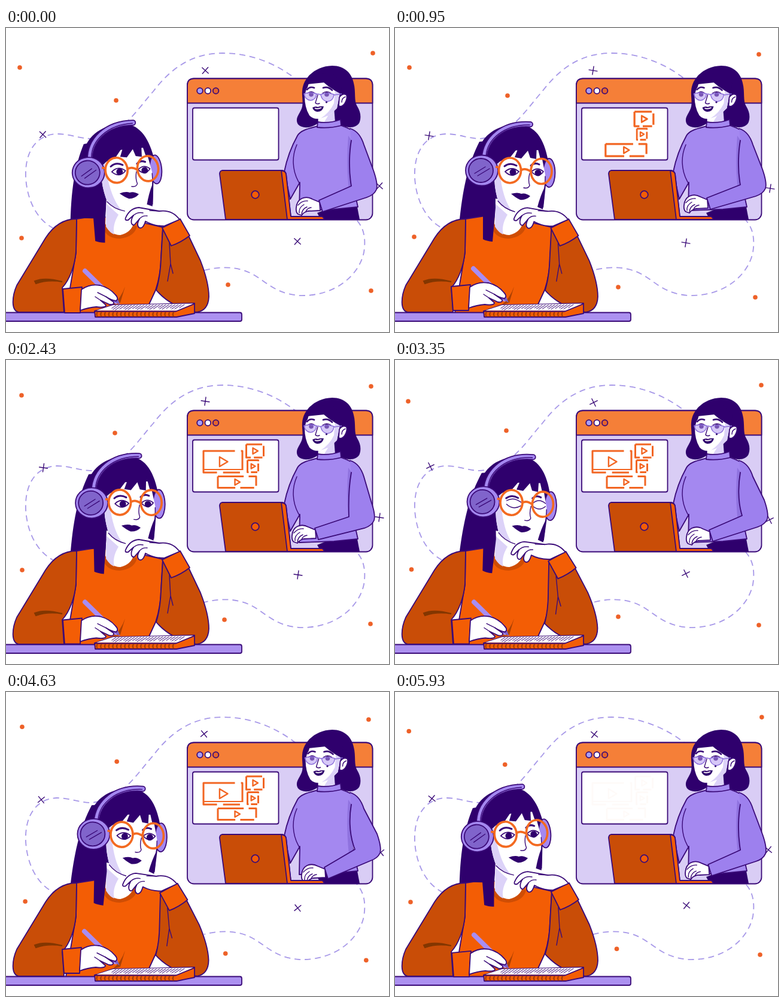
Write an HTML page that moves like this. It is 640 px wide and 508 px high and loops after 5980 ms.

```html
<!DOCTYPE html>
<html lang="en">
<head>
<meta charset="utf-8">
<title>Online lesson</title>
<style>
html, body { margin: 0; width: 100%; height: 100%; overflow: hidden; background: #fff; }
svg { display: block; width: 100vw; height: 100vh; }
.o { stroke: #3a0a78; stroke-width: 1.8; stroke-linejoin: round; stroke-linecap: round; }
.l { fill: none; stroke: #3a0a78; stroke-width: 1.4; stroke-linejoin: round; stroke-linecap: round; }
.ink { fill: #2f006d; }
.lav { fill: #a488f0; }
.org { fill: #f35d05; }
.rust { fill: #c94d07; }
.skin { fill: #fff; }
.shade { fill: #dcd2f8; }
.icon { fill: none; stroke: #f26522; stroke-width: 3; stroke-linejoin: round; }
</style>
</head>
<body>
<svg viewBox="0 0 640 508" xmlns="http://www.w3.org/2000/svg">
  <g id="trail" fill="none" stroke="#a798e8" stroke-width="1.8" stroke-dasharray="10 7">
    <path d="M80 335C50 320 35 285 33 250C31 205 52 178 85 177C110 177 130 188 150 184C195 178 220 135 246 106C275 68 310 42 362 42C410 42 452 60 484 85"/>
    <path d="M331 405C350 400 372 398 394 404C430 414 440 443 490 447C550 449 590 413 598 375C602 350 597 333 586 321"/>
  </g>
  <g id="drift"></g>

  <!-- browser window -->
  <rect class="o" x="303" y="84.500" width="309.500" height="236" rx="11" fill="#d9cdf5"/>
  <path class="o" d="M303 125.500V95.500Q303 84.500 314 84.500H601.500Q612.500 84.500 612.500 95.500V125.500Z" fill="#f57f38"/>
  <g class="o">
    <circle cx="324" cy="105" r="4.800" fill="#a9a0f5"/><circle cx="337.300" cy="105" r="4.800" fill="#fff"/><circle cx="350.600" cy="105" r="4.800" fill="#e5652c"/>
  </g>
  <rect class="o" x="312" y="133.500" width="143.500" height="87" rx="3" fill="#fff"/>
  <g id="icons"></g>

  <!-- teacher -->
  <g>
    <path class="ink" d="M545 63C566 63 578 76 581 92C585 107 581 122 587 131C592 139 594 148 591 157C587 167 572 168 562 163L520 160C509 168 494 168 488 161C483 152 488 147 493 137C498 127 494 116 495 105C496 85 515 64 545 63Z"/>
    <path class="ink" d="M520 309L548 298L586 294L591 320H526Z"/>
    <path class="o lav" d="M521 164C505 168 492 171 487 180C477 198 469 220 465 240L475 286L491 258L490 305L548 303L588 299L576 245L590 180C583 172 572 167 560 163Z"/>
    <path d="M572 180Q568 230 573 270L580 266L579 190Z" fill="#8f72df"/>
    <path class="l" d="M486 195C478 213 477 237 490 259"/>
    <path class="shade" d="M521 143L548 132L550 158L522 160Z"/>
    <path class="skin" d="M522 148L538 147L531 158H522Z"/>
    <path class="o lav" d="M521 157Q540 160 559 153L560 163Q541 168 520 166Z"/>
    <path id="arm" class="o" fill="#9d80ee"/>
    <g id="typing">
      <path class="o skin" d="M525 305L504 306Q497 308 494 313L488 311Q484 308 485 300Q486 289 494 285Q503 281 512 286L524 291Z"/>
      <path class="l" d="M490 309Q489 300 498 295M494 311Q495 302 503 299M501 307Q503 301 510 300M488 296Q495 288 504 289"/>
    </g>
    <g id="teacherFace">
      <path class="skin" d="M504 94L499 113Q499 133 507 146Q514 154 526 151Q541 147 553 134L558 108L542 90Z"/>
      <path class="shade" d="M550 102L558 108L553 134Q541 147 526 151Q541 141 548 126Z"/>
      <path class="o skin" d="M557 116Q563 108 569 112Q571 118 566 126Q561 133 556 130Z"/>
      <path class="l" d="M561 124Q561 117 567 115"/>
      <path class="ink" d="M504 99Q508 82 522 82Q536 98 559 110L562 92L545 75L511 78Q499 89 500 105Z"/>
      <path class="l" d="M503 103Q508 97 515 100M530 100Q538 97 545 104" style="stroke-width:2.600"/>
      <g class="open"><circle class="ink" cx="510" cy="111" r="3.800"/><circle class="ink" cx="536" cy="111" r="3.800"/><path class="l" d="M504 109Q510 104 516 109M529 109Q536 104 543 109"/></g>
      <path class="l shut" d="M503 112Q509 116 516 112M529 112Q536 117 543 112"/>
      <g stroke="#8d70dc" stroke-width="1.500" fill="#b49bf0" fill-opacity=".55">
        <path d="M498 110Q508 106 519 110Q518 120 509 121Q500 120 498 110ZM526 111Q537 107 548 111Q547 122 537 123Q527 121 526 111Z"/>
        <path d="M519 111Q522 109 526 112M548 112L561 110" fill="none"/>
      </g>
      <path class="l" d="M521 112L517 125Q519 128 524 126"/>
      <path class="ink" d="M512 133Q517 130 521 132Q526 130 531 131Q529 140 520 140Q514 139 512 133Z"/>
      <path d="M516 134Q521 136 527 133" stroke="#fff" stroke-width="1.800" fill="none"/>
      <circle class="ink" cx="535.500" cy="124" r="1.600"/>
    </g>
  </g>

  <!-- laptop -->
  <path class="o rust" d="M361 238H461Q467 239 468 244L476 316L472 320H367L357 244Q357 239 361 238Z"/>
  <path class="o org" d="M460 238Q467 239 468 244L476 315H528Q532 317 531 320H470Z"/>
  <circle class="o org" cx="416.500" cy="278.500" r="6.300"/>

  <!-- student -->
  <path class="ink head" d="M141 190C126 220 114 255 107 330H165L175 260H240L242 300H248L256 225L240 180Z"/>
  <path class="org o" d="M118 319L150 314L215 322L262 333L259 385Q258 415 250 438L238 464L180 476H100L117 375Z"/>
  <path class="o rust" d="M118 319C94 319 77 334 66 351L18 430C10 448 8 472 21 475H97L94 434C107 420 115 396 117 374Z"/>
  <path d="M48 423Q65 416 94 424Q70 420 50 427Z" fill="#833600" stroke="#833600" stroke-width="2"/>
  <path d="M199 432Q192 452 178 463L191 459Z" fill="#a94004"/>
  <path d="M160 326Q164 352 190 352Q215 349 219 331L209 328Q190 350 168 326Z" fill="#cf4d04"/>
  <path class="skin" d="M168 285L166 327Q174 346 191 346Q209 342 214 325L210 295Z"/>
  <path class="shade" d="M168 294L167 332Q174 343 181 345Q177 330 188 312Z"/>
  <g class="head">
    <ellipse class="o lav" cx="257.500" cy="242" rx="10" ry="24"/>
    <path class="skin" d="M164 205L165 245Q167 274 173 291Q190 307 211 308Q239 306 245 290Q251 274 251 245L243 204Z"/>
    <path class="shade" d="M164 222L165 245Q167 274 173 291L196 307Q176 281 174 222Z"/>
    <path class="l" d="M172 289Q182 302 200 307M251 248Q251 274 245 289"/>
    <path class="ink" d="M250 266Q243 280 238 299L247 303Q250 285 250 266Z"/>
    <path class="ink" d="M141 200C150 175 176 161 205 161C234 162 249 184 256 222L243 219L237 195L236 219L226 217L222 205L211 218L200 216L207 198L191 218L177 222L165 231L168 300L163 357Q153 356 147 353V315L118 312C126 270 132 225 141 200Z"/>
    <path d="M149 218C151 185 180 158 226 161" class="l" style="stroke-width:10"/>
    <path d="M149 218C151 185 180 158 226 161" class="l" style="stroke:#a488f0;stroke-width:6.500"/>
    <path d="M152 214C154 186 182 161 225 162" class="l"/>
    <ellipse class="o lav" cx="145" cy="238" rx="27" ry="25.500"/>
    <ellipse class="o" cx="143.500" cy="238" rx="20.500" ry="20" fill="#8064cb"/>
    <path class="l" d="M133 243L151 232M138 247L158 235"/>
    <path class="l" d="M183 231Q192 224 203 230M227 230Q233 224 241 228" style="stroke-width:3"/>
    <g class="open">
      <path class="l" d="M184 240Q195 230 207 240Q196 252 184 240M228 240Q238 231 248 240Q239 252 228 240" style="stroke-width:1.800"/>
      <circle class="ink" cx="197" cy="241" r="5.500"/><circle class="ink" cx="239" cy="242" r="5.500"/>
    </g>
    <path class="l shut" d="M184 235Q195 228 208 237M184 241Q195 251 208 243M228 238Q238 229 249 238M228 243Q239 252 249 243"/>
    <path class="l" d="M225 243Q222 255 225 263Q223 269 215 267"/>
    <path class="ink" d="M194 277Q205 274 211 277Q218 275 226 281Q219 288 209 287Q202 284 194 277Z"/>
    <g fill="none" stroke="#f36a21" stroke-width="3.700">
      <ellipse cx="192" cy="238" rx="18.500" ry="21"/><ellipse cx="244.500" cy="239.500" rx="17.500" ry="21"/>
      <path d="M210 238Q217 233 227 240M174 233L168 232"/>
    </g>
  </g>
  <g id="chinArm">
    <path class="o rust" d="M262 335L259 385Q258 415 251 438Q264 453 281 462Q300 474 319 475Q338 472 339 449Q339 425 325 389L306 349Z"/>
    <path class="l" d="M273 360L275 394L270 423M275 394L279 410"/>
    <path class="o org" d="M261 334L291 319L307 347Q293 358 276 364Z"/>
    <path class="o skin" d="M290 320C282 309 270 304 256 306L222 300Q207 301 200 317Q198 322 204 321L213 313Q208 321 210 327Q213 332 217 326L223 319Q217 330 223 334Q229 336 233 323Q247 331 264 331Z"/>
    <path class="l" d="M213 313Q220 307 229 309M223 319Q228 313 236 314M256 306L240 305"/>
  </g>

  <!-- desk -->
  <path class="o" d="M-5 475.500H391Q394 475.500 394 479V487Q394 490 391 490H-5Z" fill="#ac91f0"/>
  <g id="writing">
    <path d="M132 406L184 457" stroke="#a88df3" stroke-width="8" stroke-linecap="round"/>
    <path d="M179 456L185 450L191 463Z" fill="#7d62c9"/>
    <path class="o org" d="M95 436L127 433L124 476H98Z"/>
    <path class="o skin" d="M126 437Q140 427 157 430Q173 434 183 446Q189 452 184 456Q176 455 167 449L180 458Q181 463 173 462L158 455L167 463Q167 468 151 466Q138 467 124 472Z"/>
    <path class="l" d="M167 449L153 442M158 455L149 449"/>
  </g>
  <path class="o org" d="M148 473L178 463L315 460V477L285 483H149Z"/>
  <path class="skin" d="M151 472L179 463L313 460.500L286 472.500Z"/>
  <path class="o" d="M148 473.500H284L315 461" fill="none"/>
  <g id="pageMarks" fill="none"></g>
</svg>
<script>
const LOOP = 5.98, HALF = LOOP / 2;
const POSES = [0, .95, 1.73, 2.43, 3.35, 4.63];
const DRIFTS = [0, .36, .95, 1.68, 2.43];
const $ = s => document.querySelector(s);
const all = s => [...document.querySelectorAll(s)];
const clamp = v => Math.max(0, Math.min(1, v));

function add(parent, tag, attrs) {
  const el = document.createElementNS('http://www.w3.org/2000/svg', tag);
  for (const k in attrs) el.setAttribute(k, attrs[k]);
  return parent.appendChild(el);
}

// Smooth closed curve through values at the given times.
function track(t, times, values, period) {
  const n = times.length;
  const at = i => times[(i + n) % n] + period * Math.floor(i / n);
  const val = i => values[(i + n) % n];
  const slope = i => (val(i + 1) - val(i - 1)) / (at(i + 1) - at(i - 1));
  let i = n - 1;
  while (times[i] > t) i--;
  const d = at(i + 1) - at(i), u = (t - at(i)) / d, v = 1 - u;
  return v * v * (1 + 2 * u) * val(i) + u * v * v * d * slope(i)
    + u * u * (3 - 2 * u) * val(i + 1) - u * u * v * d * slope(i + 1);
}
const pose = (t, ...values) => track(t, POSES, values, LOOP);

const dots = [
  [[23, 22, 24, 27, 26], [66, 69, 66, 58, 59]],
  [[184, 186, 188, 185, 182], [121, 118, 113, 116.500, 122]],
  [[613, 612, 608, 606, 610], [42, 42, 44, 46, 44]],
  [[26, 27.500, 32, 32, 27], [351, 350, 349, 350, 351]],
  [[371, 373, 373, 366.500, 365], [429, 429, 433, 437, 434]],
  [[610, 608, 602, 602, 609], [439, 443, 450, 448, 441]]
].map(([x, y]) => ({ x, y, el: add($('#drift'), 'circle', { r: 3.8, fill: '#ee6128' }) }));

const crosses = [
  [[333, 332, 331, 331, 333], [71, 71, 71, 70, 69]],
  [[61.500, 59, 57, 59, 62.500], [178, 178, 180, 180, 180]],
  [[624, 626, 627, 626, 624], [264, 267, 268, 268, 263]],
  [[487, 486, 486, 487.500, 488], [356.500, 357, 359, 361, 359]]
].map(([x, y]) => ({ x, y, el: add($('#drift'), 'path', { class: 'l', d: 'M-7 0H7M0-7V7' }) }));

const icons = [
  { x: 362.500, y: 170, w: 65, h: 36, play: 8, start: 1.02, bar: true },
  { x: 416, y: 152, w: 29, h: 22, play: 5, start: .68 },
  { x: 412.500, y: 177.500, w: 18, h: 20, play: 4, start: .82 },
  { x: 386, y: 204, w: 64, h: 19, play: 5, start: .64 }
].map(icon => {
  const { w, h, play, bar } = icon;
  const el = add($('#icons'), 'g', { class: 'icon' });
  add(el, 'rect', { x: -w / 2, y: -h / 2, width: w, height: h, pathLength: 100, 'stroke-dasharray': '26 5 17 4 14 5 29 0' });
  add(el, 'path', { d: `M${-play * .7} ${-play}L${play} 0L${-play * .7} ${play}Z`, 'stroke-width': 2.4 });
  if (bar) add(el, 'path', { d: `M${-w / 2} ${h / 2 - 5}H${w / 2}`, 'stroke-width': 2 });
  return { ...icon, el };
});

for (let i = 0; i < 20; i++) {
  const x = 153 + i * 6.7;
  add($('#pageMarks'), 'path', { d: `M${x} 474.500q-3 4 0 8`, stroke: '#a43c05', 'stroke-width': 2.2 });
}
for (let i = 0; i < 23; i++) {
  const x = 184 + i * 5.2, len = 5 + 3 * Math.abs(Math.sin(i * 2.3));
  add($('#pageMarks'), 'path', { d: `M${x} ${463.500 - i * .07}l${-len * 1.5} ${len}`, stroke: '#3a0a78', 'stroke-width': 1 });
}

function pop(t, start) {
  const u = clamp((t - start) / .42) - 1;
  return u <= -1 ? 0 : 1 + 2.7 * u ** 3 + 1.7 * u ** 2;
}

function blink(root, closed) {
  all(`${root} .open`).forEach(el => el.style.display = closed ? 'none' : '');
  all(`${root} .shut`).forEach(el => el.style.display = closed ? '' : 'none');
}

function draw(t) {
  const p = t % HALF;
  $('#trail').setAttribute('stroke-dashoffset', -17 * p / HALF);
  const place = o => `translate(${track(p, DRIFTS, o.x, HALF)} ${track(p, DRIFTS, o.y, HALF)})`;
  dots.forEach(o => o.el.setAttribute('transform', place(o)));
  crosses.forEach(o => o.el.setAttribute('transform', `${place(o)} rotate(${42 + 180 * p / HALF})`));

  icons.forEach(o => o.el.setAttribute('transform', `translate(${o.x} ${o.y}) scale(${pop(t, o.start)})`));
  $('#icons').setAttribute('opacity', clamp((5.94 - t) / .4));

  const tilt = pose(t, -4.7, 0, 0, -1.2, 1.6, .9);
  all('.head').forEach(el => el.setAttribute('transform', `rotate(${tilt} 185 328)`));
  $('#chinArm').setAttribute('transform', `rotate(${pose(t, 0, -.3, 0, 0, -2.2, -1.8)} 312 462)`);
  $('#writing').setAttribute('transform',
    `translate(${pose(t, 0, -1, -1, 0, 0, -1)} ${pose(t, 0, -4, -4, -1.5, -1.5, -6)})`);

  const hx = pose(t, 0, -2, -8, -7, 2, 9), hy = pose(t, 0, -4, -7, -7, -4, 5);
  const ex = pose(t, 0, 0, -4, -4, 3, 6), ey = pose(t, 0, -2, -2, -2, -4, -1);
  $('#typing').setAttribute('transform', `translate(${hx} ${hy})`);
  $('#arm').setAttribute('d', `M575 168C588 172 594 182 598 195L${614 + ex} ${238 + ey}
    Q${622 + ex} ${261 + ey} ${619 + ex} ${270 + ey}Q${615 + ex} ${279 + ey} ${603 + ex} ${283 + ey}
    L${529 + hx} ${307 + hy}L${523 + hx} ${288 + hy}L${577 + ex} ${264 + ey}C572 235 574 205 577 188`);
  $('#teacherFace').setAttribute('transform', `translate(${pose(t, 0, 1.5, .5, 0, 2, 1.5)} 0)`);

  blink('#teacherFace', Math.abs(t - 1.73) < .1);
  blink('.head', Math.abs(t - 3.35) < .1);
}

const begin = performance.now();
function tick() {
  draw((performance.now() - begin) / 1000 % LOOP);
  requestAnimationFrame(tick);
}
draw(0);
requestAnimationFrame(tick);
</script>
</body>
</html>
```
